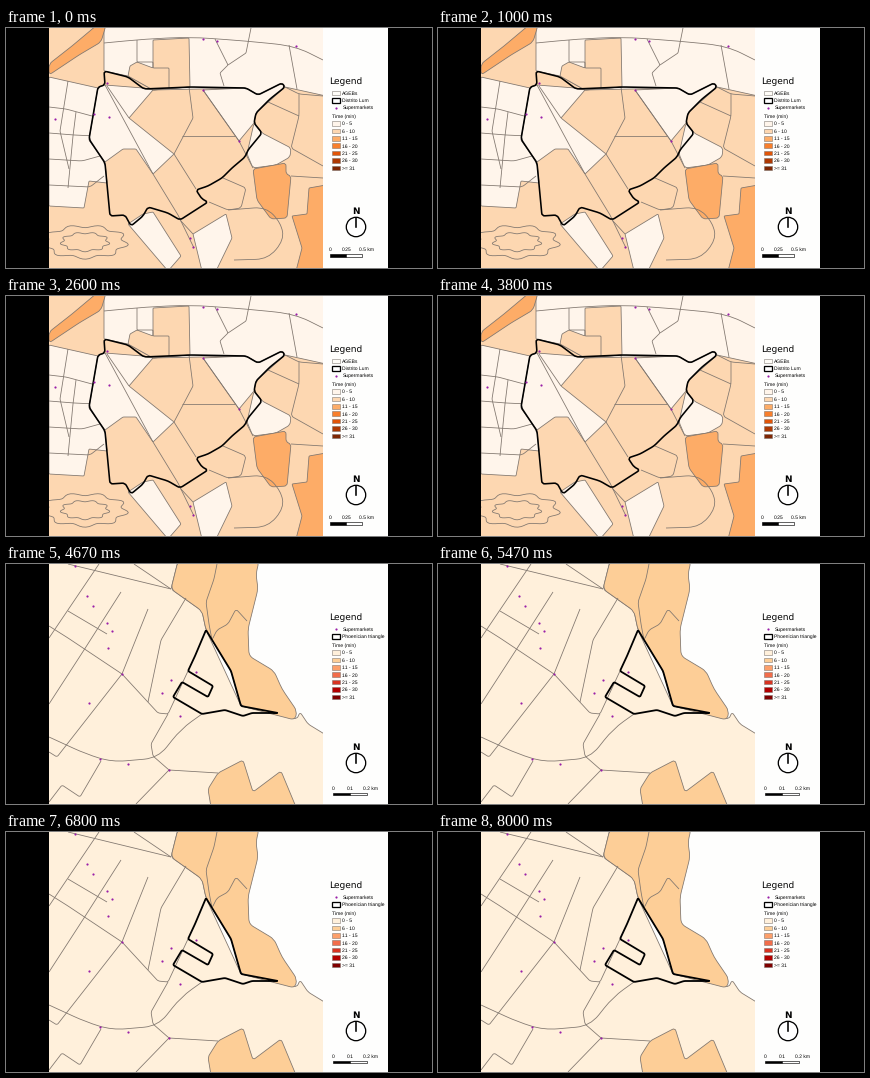
Recreate the animation shown at these times as a matplotlib script. Size 426 by 240 pixels, loop 8070 ms.

```python
import matplotlib.pyplot as plt
import numpy as np
from matplotlib.animation import FuncAnimation
from matplotlib.patches import Circle, PathPatch, Rectangle
from matplotlib.path import Path

W, H, DPI = 426, 240, 100
STEP, FRAMES, CUT = 30, 269, 134
PT = 72 / DPI
DOT, LINE = "#9a1fa8", "#81776f"

plt.rcParams["text.hinting"] = "none"
plt.rcParams["text.hinting_factor"] = 1
fig = plt.figure(figsize=(W / DPI, H / DPI), dpi=DPI, facecolor="black")


def ramp(name, low, power):
    """Seven class colours, denser at the light end."""
    return plt.get_cmap(name)(low + (1 - low) * np.linspace(0, 1, 7) ** power)


def pts(s):
    return np.array([p.split(",") for p in s.split()], float)


def rounded(p, r, closed):
    """Path through key points with corners rounded by radius r."""
    if closed:
        p = np.vstack([p[-1:], p, p[:1]])
    verts, codes = [], []
    for a, b, c in zip(p, p[1:], p[2:]):
        near = lambda q: b + (q - b) * min(0.5, r / np.hypot(*(q - b)))
        verts += [near(a), b, near(c)]
        codes += [Path.LINETO, Path.CURVE3, Path.CURVE3]
    if closed:
        codes[0] = Path.MOVETO
        return Path(verts + [verts[0]], codes + [Path.CLOSEPOLY])
    return Path([p[0], *verts, p[-1]], [Path.MOVETO, *codes, Path.LINETO])


class Scene:
    def __init__(self, colors):
        self.colors = colors
        self.ax = ax = fig.add_axes([0, 0, 1, 1])
        ax.set(xlim=(0, W), ylim=(H, 0))
        ax.axis("off")
        self.rect(43, 0, 339, H, "#fefefd", lw=0)
        self.clip = Rectangle((43, 0), 274, H, transform=ax.transData)

    def rect(self, x, y, w, h, color, edge="none", lw=0.5):
        self.ax.add_patch(Rectangle((x, y), w, h, fc=color, ec=edge, lw=lw * PT))

    def draw(self, path, color="none", edge=LINE, lw=0.8):
        patch = PathPatch(path, fc=color, ec=edge, lw=lw * PT)
        self.ax.add_patch(patch)
        patch.set_clip_path(self.clip)

    def area(self, s, level=0, r=1):
        self.draw(rounded(pts(s), r, True), self.colors[level])

    def road(self, *paths, r=3):
        for s in paths:
            self.draw(rounded(pts(s), r, False))

    def border(self, s, r, lw):
        self.draw(rounded(pts(s), r, True), edge="black", lw=lw)

    def dots(self, s):
        self.ax.plot(*pts(s).T, "o", color=DOT, ms=2.2 * PT, mew=0)

    def label(self, x, y, s, size=4.9, ha="left", font="Liberation Sans", **style):
        self.ax.text(x, y, s, size=size * PT, ha=ha, va="center_baseline",
                     family=font, color="black", **style)

    def swatch(self, y, color, edge="#77706a", lw=0.5):
        self.rect(326.3, y - 2.3, 7.6, 4.6, color, edge, lw)

    def legend(self, rows, y):
        self.label(323.5, 53, "Legend", 9, font="DejaVu Sans")
        for i, (kind, name) in enumerate(rows):
            row = 65 + 7.3 * i
            if kind == "dot":
                self.dots(f"330,{row}")
            elif kind == "bold":
                self.swatch(row, "white", "black", 1.3)
            else:
                self.swatch(row, "#fffdf8")
            self.label(336.3, row, name)
        self.label(326, y, "Time (min)")
        for i, color in enumerate(self.colors):
            row = y + 7.5 + 7.4 * i
            self.swatch(row, color)
            self.label(336.3, row, f"{5 * i + (i > 0)} - {5 * i + 5}" if i < 6 else ">= 31")

    def compass(self):
        self.label(350, 183, "N", 8.6, "center", "DejaVu Sans", weight="bold")
        self.ax.add_patch(Circle((350, 199), 9.7, fc="white", ec="black", lw=1.3 * PT))
        self.ax.plot([350, 350], [190, 199], color="black", lw=1.6 * PT)

    def scale(self, x, y, half, unit):
        for i, color in enumerate(("black", "white")):
            self.rect(x + i * half, y - 1.4, half, 2.8, color, "black", 0.6)
        for i in range(3):
            text = f"{i * unit:g}" + " km" * (i == 2)
            self.label(x + i * half + 4 * (i == 2), y - 6.3, text, ha="center")


def district():
    s = Scene(ramp("Oranges", 0, 0.87))
    s.rect(43, 0, 274, H, s.colors[1], lw=0)
    # north
    s.area("98,-3 320,-3 320,68 279,59 252,67 240,60 147,62 122,48 98,43")
    s.area("147,12 183,10 184,59 147,62 122,48 124,38 131,34 147,40", 1)
    s.road("98,15 140,11 184,9 240,13 289,18 317,32", r=20)
    s.road("131,12 131,34 147,34 147,40 163,40 163,60", r=1)
    s.road("209,11 222,37 214,45 218,58", "222,37 240,25 245,0", "283,17 291,61", r=1)
    s.area("43,36 66,18 91,-3 100,-3 95,14 73,27 43,47", 2, 4)
    # west
    s.area("43,49 92,60 83,112 99,134 101,155 83,153 78,180 43,178")
    for k in range(4):
        s.road(f"43,{79 + 26 * k} {60 + 8 * k},{81 + 26 * k} {86 + 4 * k},{88 + 20 * k}")
    s.road("62,53 54,103 63,141", "70,84 67,108 62,160", r=1)
    t = np.linspace(0, 2 * np.pi, 90)
    bump = 1 + 0.09 * np.sin(9 * t)
    for size in (1, 1.75):
        ring = np.c_[79 + 23 * size * bump * np.cos(t), 214 + 9 * size * bump * np.sin(t)]
        s.draw(Path(ring))
    # centre
    s.area("99,57 137,60 147,62 123,90 168,126 147,146 130,121 117,121 99,134 83,112 92,59")
    s.area("197,62 240,60 252,67 276,55 279,59 250,85 248,95 233,113")
    s.road("99,57 147,146 172,187 188,220", "101,58 123,90", "147,62 183,59 187,90 168,126 190,161",
           "176,108 229,108", "197,62 233,113 247,140", r=1)
    # east and south
    s.area("248,95 256,105 285,120 284,129 270,137 247,140 241,126", r=3)
    s.area("247,141 280,135 280,146 285,148 281,190 265,191 251,172", 2, 3)
    s.area("286,188 301,186 303,160 320,157 320,243 290,243 296,220", 2)
    s.area("122,196 137,186 147,184 175,228 162,243")
    s.area("187,206 220,186 226,210 210,243 196,243")
    s.road("279,59 293,66 317,68", "293,66 293,88 285,120 317,138", "262,74 293,88",
           "285,148 317,150", "203,174 222,182 235,180 240,160 217,150", "174,192 187,206")
    s.road("222,182 260,179 275,195 278,212 262,231 228,232", r=12)
    s.border("98,43 122,49 138,61 185,59 240,60 252,67 276,55 279,59 264,71 250,85 248,95 256,105 "
             "242,122 239,129 226,140 216,150 202,158 190,162 196,171 202,174 174,192 162,185 "
             "142,179 137,188 125,198 119,187 104,188 99,135 83,111 92,59 99,57", 3, 1.6)
    s.dots("197,11 211,13 290,18 101,55 103,89 197,62 233,113 49,91 88,86 184,210 187,219")
    s.legend([("box", "AGEBs"), ("bold", "Distrito Lum"), ("dot", "Supermarkets")], 88)
    s.scale(324.3, 227.3, 16, 0.25)
    return s


def triangle():
    s = Scene(ramp("OrRd", 0.06, 0.8))
    s.area("40,-3 172,-3 165,25 196,47 200,66 235,142 291,155 294,148 302,160 320,171 320,243 40,243", r=3)
    s.area("172,-3 253,-3 250,10 252,25 242,65 243,92 268,107 276,125 291,147 289,156 "
           "235,142 225,107 200,66 196,47 165,25", 1, 5)
    s.area("202,225 212,209 237,196 247,228 275,207 290,243 205,243", 1, 3)
    s.road("211,0 208,15 200,38 203,60 206,76 211,66 222,60 230,45 241,57")
    s.road("43,74 93,0", "43,62 62,74 116,110 152,149 162,150 182,107", "128,0 165,25",
           "62,0 165,25", "62,47 101,70", "115,28 78,86 43,140", "142,45 116,110 51,193 43,188",
           "180,34 155,76 142,138", "162,150 145,180 147,192 163,206 212,209",
           "163,206 130,240", "95,197 74,233 56,221 43,238", r=2)
    s.road("43,173 80,190 106,198 152,194 175,165 196,150", r=14)
    s.border("200,66 225,107 235,142 272,149 246,149 237,152 219,146 196,150 167,133 "
             "176,118 202,133 207,122 182,107 189,92", 1.5, 1.8)
    s.dots("69,2 81,32 87,42 101,59 106,67 102,84 116,110 83,139 165,116 156,129 "
           "174,152 190,108 94,195 122,200 163,206")
    s.legend([("dot", "Supermarkets"), ("bold", "Phoenician triangle")], 81)
    s.scale(327, 230, 17, 0.1)
    return s


scenes = [district(), triangle()]
for scene in scenes:
    scene.compass()


def show(i):
    for k, scene in enumerate(scenes):
        scene.ax.set_visible(k == (i >= CUT))
    return [scene.ax for scene in scenes]


anim = FuncAnimation(fig, show, frames=FRAMES, interval=STEP, repeat=True, repeat_delay=0, blit=False)
plt.show()
```
